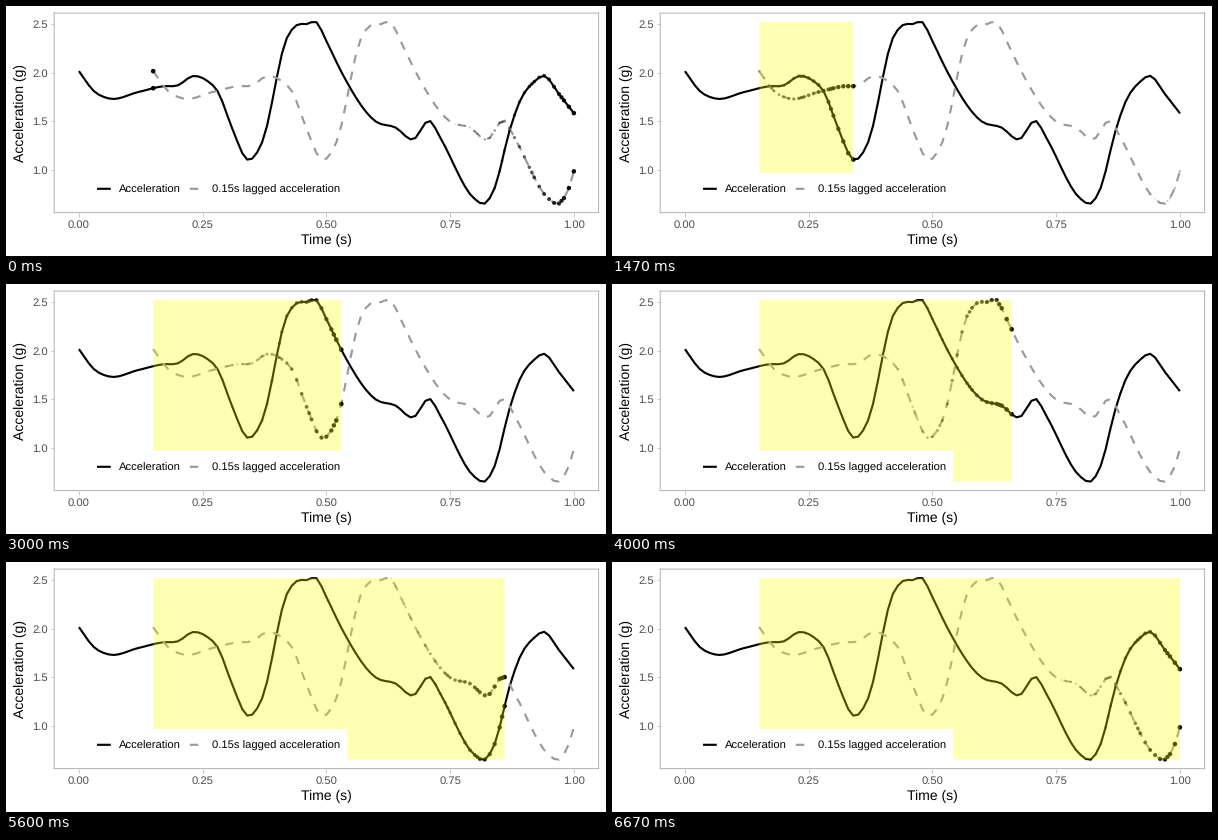
A matplotlib script for the animation above (6730 ms loop, 600 by 250 pixels).

```python
import numpy as np
import matplotlib.pyplot as plt
from matplotlib.animation import FuncAnimation
from matplotlib.lines import Line2D
from matplotlib.patches import Rectangle
from matplotlib.transforms import Affine2D

plt.rcParams["font.family"] = "Liberation Sans"
plt.rcParams["text.hinting"] = "none"

W, H, DPI = 600, 250, 100
PT = 72 / DPI                      # points per pixel
LOOP, FRAMES = 6730, 101
WAKE = 33                          # frames a point lingers
LAG = 15                           # samples, 0.01 s each
LEFT, RIGHT, TOP, BOTTOM = 48.2, 592.6, 7.1, 206.6
LO, HI = 0.65, 2.52                # range of the signal in g
BORDER, TICK_TEXT, LAG_COLOR = "#b3b3b3", "#4d4d4d", "#999999"
LINE = 2.13 * PT

# turning points and bends of the signal: (time in s, acceleration in g)
KNOTS = [
    (0, 2.015), (0.03, 1.81), (0.06, 1.734), (0.12, 1.8), (0.17, 1.859),
    (0.2, 1.869), (0.23, 1.964), (0.26, 1.912), (0.28, 1.81), (0.31, 1.42),
    (0.34, 1.103), (0.37, 1.28), (0.42, 2.356), (0.44, 2.49), (0.46, 2.5),
    (0.48, 2.52), (0.5, 2.325), (0.53, 2.01), (0.6, 1.495), (0.64, 1.433),
    (0.675, 1.31), (0.71, 1.5), (0.73, 1.33), (0.8, 0.696), (0.82, 0.65),
    (0.84, 0.81), (0.87, 1.4), (0.89, 1.696), (0.92, 1.907), (0.94, 1.967),
    (0.97, 1.778), (1, 1.582)]


def spline(x, knots):
    """Cubic Hermite curve through the knots."""
    t, v = np.array(knots).T
    slope = np.gradient(v, t)
    k = np.clip(np.searchsorted(t, x, side="right") - 1, 0, len(t) - 2)
    h = t[k + 1] - t[k]
    u = (x - t[k]) / h
    ease = u * u * (3 - 2 * u)
    bend = u * (1 - u) ** 2 * slope[k] - u * u * (1 - u) * slope[k + 1]
    return v[k] + (v[k + 1] - v[k]) * ease + h * bend


time = np.arange(101) / 100
acc = np.clip(spline(time, KNOTS), LO, HI)

# each sample lands on a whole frame; the frames left over are tweened
samples = np.arange(len(acc) - LAG)
key = np.round(samples * (FRAMES - 1) / samples[-1])
steps = np.arange(FRAMES)
head_t = np.interp(steps, key, time[LAG:])
head_acc = np.interp(steps, key, acc[LAG:])
head_lag = np.interp(steps, key, acc[:-LAG])

fig = plt.figure(figsize=(W / DPI, H / DPI), dpi=DPI, facecolor="white")
px = Affine2D().scale(1 / W, -1 / H).translate(0, 1) + fig.transFigure

ax = fig.add_axes([LEFT / W, 1 - BOTTOM / H, (RIGHT - LEFT) / W, (BOTTOM - TOP) / H])
pad = 0.05 * (HI - LO)
ax.set(xlim=(-0.05, 1.05), ylim=(LO - pad, HI + pad),
       xticks=[0, 0.25, 0.5, 0.75, 1], yticks=[1, 1.5, 2, 2.5])
ax.tick_params(length=3.5 * PT, width=0.7 * PT, color=BORDER,
               labelbottom=False, labelleft=False)
for side in ax.spines.values():
    side.set(color=BORDER, linewidth=PT, snap=False)


def label(x, y, text, size, color="black", **kw):
    fig.text(x, y, text, transform=px, fontsize=size * PT, color=color,
             va="baseline", **kw)


def legend_key(x, **style):
    fig.add_artist(Line2D([x, x + 13.8], [182.8, 182.8], transform=px, lw=LINE,
                          solid_capstyle="butt", dash_capstyle="butt",
                          snap=False, **style))


for v in ax.get_xticks():
    label(LEFT + (v + 0.05) / 1.1 * (RIGHT - LEFT), 222, f"{v:.2f}", 11.2,
          TICK_TEXT, ha="center")
for v in ax.get_yticks():
    y = TOP + (HI + pad - v) / (HI - LO + 2 * pad) * (BOTTOM - TOP)
    label(42, y + 4, f"{v:.1f}", 11.2, TICK_TEXT, ha="right")
label(320.7, 238, "Time (s)", 14, ha="center")
label(18, 106.8, "Acceleration (g)", 14, ha="center", rotation=90,
      rotation_mode="anchor")

# legend panel hides the highlight beneath it
fig.add_artist(Rectangle((82, 167), 259, 31.3, transform=px, fc="white", ec="none"))
DASH = (0, (4, 4))
legend_key(91, color="black")
legend_key(183.8, color=LAG_COLOR, ls=DASH)
label(113.3, 187, "Acceleration", 11.2)
label(206.3, 187, "0.15s lagged acceleration", 11.2)

ax.plot(time, acc, color="black", lw=LINE, solid_capstyle="butt", zorder=2)
ax.plot(time[LAG:], acc[:-LAG], color=LAG_COLOR, lw=LINE, ls=DASH,
        dash_capstyle="butt", zorder=2.1)
dots = ax.scatter([], [], linewidths=0, zorder=3, snap=False)
band = Rectangle((0.15, LO), 0, HI - LO, fc="yellow", ec="none", alpha=0.3,
                 zorder=4, snap=False)
ax.add_patch(band)

age = np.arange(WAKE - 1, -1, -1)  # oldest first, head last
fade = 1 - age / WAKE
radius = 0.71 + 1.6 * fade
dots.set_sizes(np.tile((2 * radius * PT) ** 2, 2))
rgba = np.zeros((2 * WAKE, 4))
rgba[:, 3] = np.tile(fade, 2)
dots.set_facecolors(rgba)


def draw(i):
    past = (i - age) % FRAMES
    dots.set_offsets(np.column_stack([
        np.tile(head_t[past], 2),
        np.concatenate([head_acc[past], head_lag[past]])]))
    band.set_width(head_t[i] - 0.15)
    return dots, band


anim = FuncAnimation(fig, draw, frames=FRAMES, interval=LOOP / FRAMES,
                     repeat=True, repeat_delay=0, blit=False)
plt.show()
```
